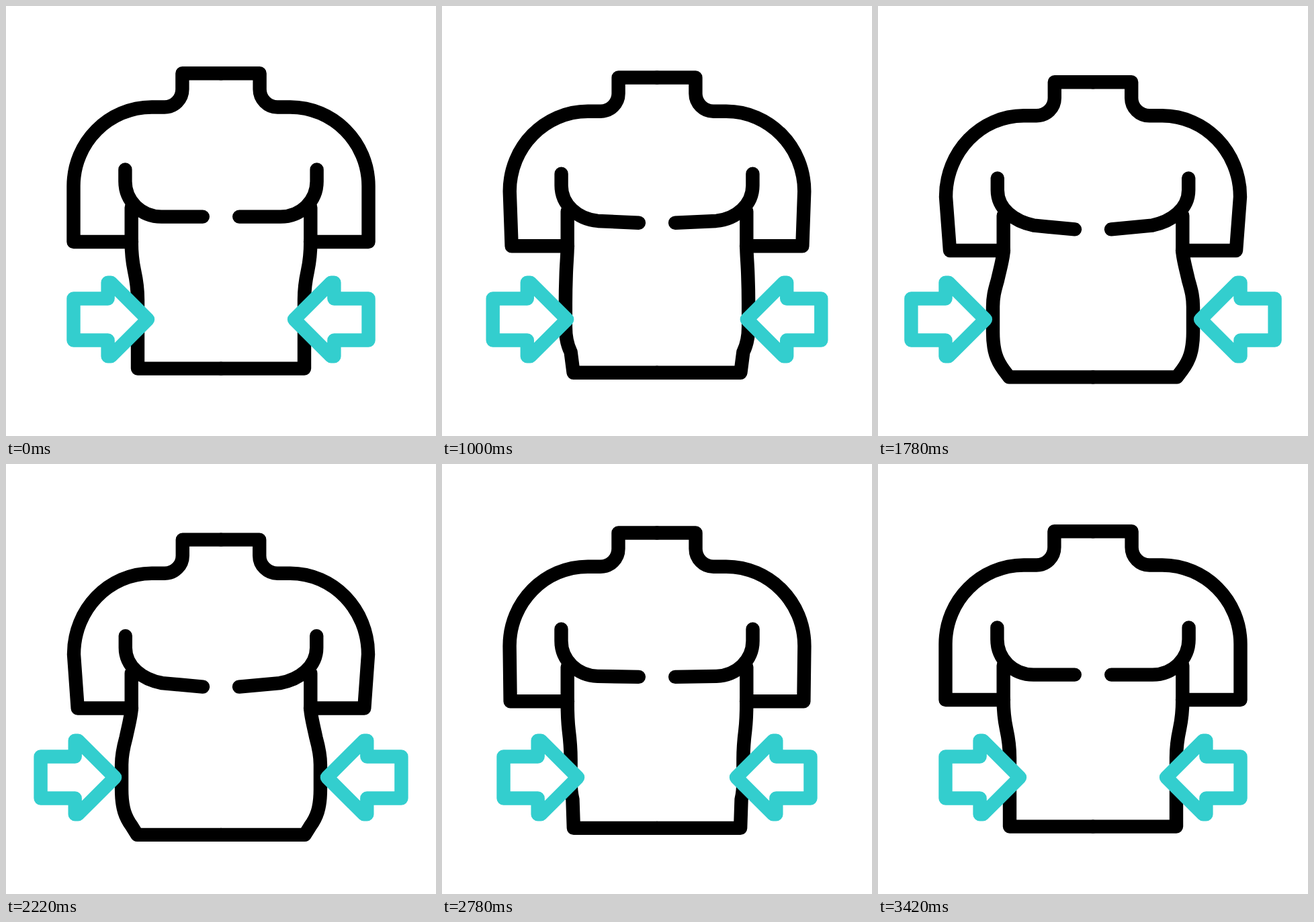
An HTML page that plays this animation: 640x640 px, repeating every 3600 ms.

```html
<!DOCTYPE html>
<html lang="en">
<head>
<meta charset="utf-8">
<title>Slimming torso</title>
<style>
  html, body { margin: 0; width: 100%; height: 100%; overflow: hidden; background: #fff; }
  svg { display: block; width: 100%; height: 100%; }
  path { fill: none; stroke: #000; stroke-width: 20.4; stroke-linecap: round; stroke-linejoin: round; }
  #arrow { fill: #fff; stroke: #33cece; }
</style>
</head>
<body>
<svg viewBox="0 0 640 640">
  <g id="half">
    <path id="shoulder"/>
    <path id="chest"/>
    <path id="side"/>
    <path id="arrow" d="M100.5 435.5H151.6V411.6H156.1L211 466.5L156.1 521.4H151.6V497.5H100.5Z"/>
  </g>
  <use href="#half" transform="matrix(-1 0 0 1 640 0)"/>
</svg>
<script>
const LOOP = 3600, STEP = 20, MOVE = 1600;
const OUT = 204, BACK = 1824;   // start of widening and of slimming
const TRAVEL = 51.1, EASE = 0.83;

// Left half of the body: slim and wide outlines with matching points
const shapes = {
  shoulder: [
    'M187 351 L100.5 351 L100.5 268 C100.5 203 153 150.5 217 150.5 L236 150.5 C250.5 150.5 262.4 138.6 262.4 124 L262.4 100.3 L320 100.3',
    'M187 364 L107 364 L101 284 C101 217 153 163.3 217 163.3 L236 163.3 C250.7 163.3 262.8 151.6 262.8 137 L262.8 113.2 L320 113.2'
  ],
  chest: [
    'M177.4 243.5 L177.4 261 C177.4 290 201 313.6 231.5 313.6 L292.8 313.6',
    'M177.8 256.5 L177.8 274 C177.8 302 203 321 232.5 326.7 L293 332.4'
  ],
  side: [
    'M186.7 300 L186.7 351 C186.7 367 188 380 191 394 C194.5 410 196 422 196 437 L196 470 C196 478 196 484 196 490 L196 539.6 L320 539.6',
    'M186.7 312 L186.7 364 C186.7 374 182 390 178 408 C173 425 171 434 171 448 L171 485 C171 514 177 528 187 541.5 L195.2 552.4 L320 552.4'
  ]
};

const byId = id => document.getElementById(id);
const clamp = v => Math.min(1, Math.max(0, v));

// cubic-bezier(EASE, 0, 1 - EASE, 1)
function ease(u) {
  let lo = 0, hi = 1;
  for (let i = 0; i < 30; i++) {
    const s = (lo + hi) / 2, r = 1 - s;
    const x = 3 * r * r * s * EASE + 3 * r * s * s * (1 - EASE) + s * s * s;
    if (x < u) lo = s; else hi = s;
  }
  return lo * lo * (3 - 2 * lo);
}

function blend([from, to], k) {
  const ends = to.match(/[\d.]+/g);
  let i = 0;
  return from.replace(/[\d.]+/g, n => (+n + (ends[i++] - n) * k).toFixed(2));
}

function draw(t) {
  const k = ease(clamp((t - OUT) / MOVE)) - ease(clamp((t - BACK) / MOVE));
  for (const id in shapes) byId(id).setAttribute('d', blend(shapes[id], k));
  byId('arrow').setAttribute('transform', `translate(${-TRAVEL * k} 0)`);
}

const start = performance.now();
function tick() {
  const t = (performance.now() - start) % LOOP;
  draw(Math.floor(t / STEP) * STEP);
  requestAnimationFrame(tick);
}
tick();
</script>
</body>
</html>
```
